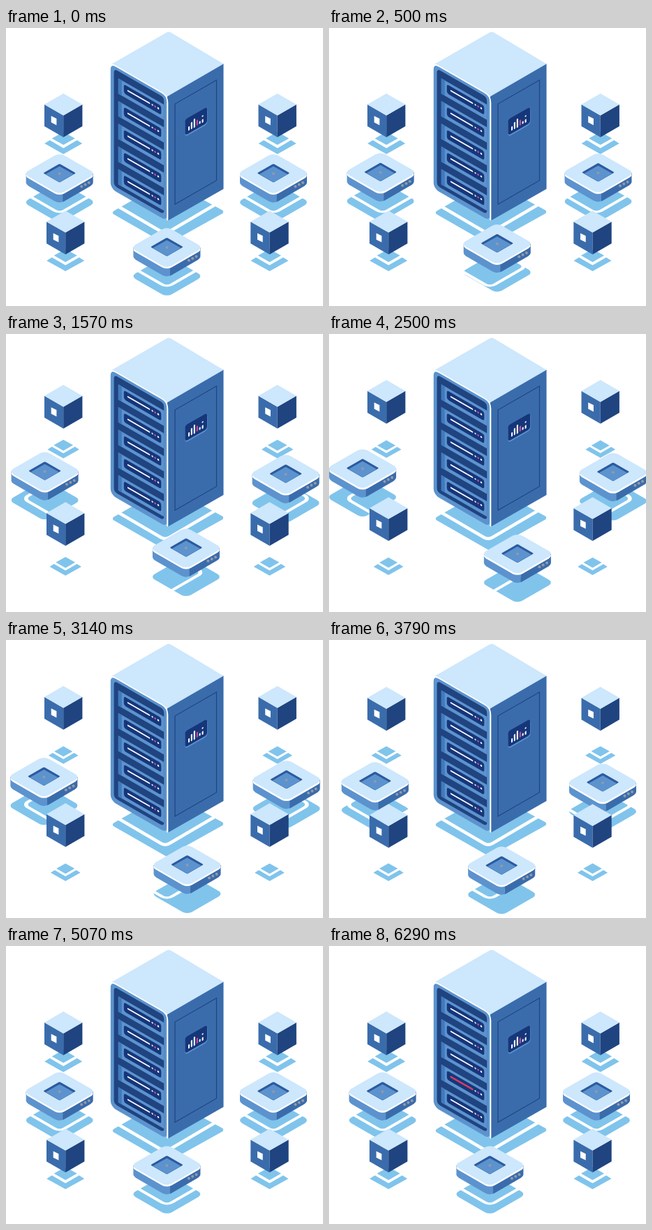
Write an HTML page that moves like this. It is 454 px wide and 399 px high and loops after 7210 ms.

```html
<!DOCTYPE html>
<html lang="en">
<head>
<meta charset="utf-8">
<title>Server network</title>
<style>
html, body { margin: 0; width: 100%; height: 100%; overflow: hidden; background: #fff; }
svg { display: block; width: 100vw; height: 100vh; }
</style>
</head>
<body>
<svg id="stage" viewBox="0 0 454 399"></svg>
<script>
const LOOP = 7210, FPS = 14;
const C = {
  pale: '#cde7fc', mid: '#5c93ce', main: '#3a6cac', navy: '#1f4480',
  deep: '#16367a', glow: '#80c4ec', red: '#e2304f', pink: '#d94f9c', grey: '#949aa6'
};

const group = (content, attrs = '') => `<g ${attrs}>${content}</g>`;
const path = (d, fill, extra = '') => `<path d="${d}" fill="${fill}" ${extra}/>`;
const line = (d, color, width, extra = '') =>
  path(d, 'none', `stroke="${color}" stroke-width="${width}" stroke-linecap="round" stroke-linejoin="round" ${extra}`);
const rect = (x, y, w, h, fill, rx = 0, extra = '') =>
  `<rect x="${x}" y="${y}" width="${w}" height="${h}" rx="${rx}" fill="${fill}" ${extra}/>`;
const dot = (x, y, r, fill) => `<circle cx="${x}" cy="${y}" r="${r}" fill="${fill}"/>`;

// Rounded square lying on the isometric floor
const tile = (cy, side, r, fill, extra = '') =>
  group(rect(-side / 2, -side / 2, side, side, fill, r, extra),
    `transform="matrix(.866 .5 -.866 .5 0 ${cy})"`);

function rack() {
  let front = rect(0, 0, 81, 180, C.mid, 8) + rect(4.8, 5, 71.7, 168, C.navy, 5);
  for (let i = 0; i < 5; i++) {
    const y = 25.3 + i * 32.6;
    front += rect(11, y - 10, 65.5, 22, C.mid) + rect(11, y - 10, 5, 22, '#4179bd')
      + rect(19, y - 6, 53.5, 13, C.deep, 3)
      + line(`M25 ${y}H55.5`, '#fff', 2)
      + dot(59.8, y, 1.2, '#dcecff') + dot(63.8, y, 1.3, C.pink) + dot(68.2, y, 1.3, '#fff');
    if (i === 3) front += line(`M25 ${y}H55.5`, C.red, 2.4, 'id="alert" pathLength="1"');
  }
  front += line('M2 1.2Q4 0 8 0H73Q81.5 0 81.5 9V178', '#fff', 2);

  const bars = [[31, 62, 6], [34.8, 58, 10], [38.8, 55.5, 13], [42.8, 59.5, 8], [46.6, 63.5, 4], [50.6, 63, 5]];
  let side = rect(11, 18.4, 59.5, 144, 'none', 0, `stroke="${C.navy}" stroke-width="1.2"`)
    + rect(25.5, 50.5, 32, 23.5, C.mid, 4) + rect(25.5, 49, 31.5, 23, C.deep, 3.5);
  bars.forEach(([x, y, h], i) => { side += rect(x - 1, y, 2, h, i === 3 ? C.pink : '#fff', 1); });
  side += dot(50.6, 58.5, 1.1, '#fff');

  return line('M156 265L231 222L308 264L230 307.5Z', C.glow, 6, `style="fill:${C.glow}"`)
    + line('M152 251L222 292Q228 295.5 234 292L308 248.5', '#fff', 4.5)
    + path('M231 97L311.5 51V231L231 277Z', C.main)
    + path('M151 52L229 7Q233 4 237 7L311.5 51.5L231.5 98Z', C.pale)
    + group(front, 'transform="matrix(1 .577 0 1 149.8 50.5)"')
    + group(side, 'transform="matrix(1 -.577 0 1 231 97)"');
}

// The white floor outline stays put while the box and its glow move
function box(id, x, y) {
  const body = path('M-48 0V13Q-48 15.5 -44.5 17.8L-7 39.6Q-3.5 41.6 0 41.6L4.5 40.6V0Z', C.mid)
    + path('M48 0V13Q48 15.5 44.5 17.8L7 39.6L4.5 40.8V0Z', C.main)
    + tile(2.6, 60, 8, '#fff') + tile(0, 60, 8, C.pale)
    + tile(-.7, 27, 1.5, '#2b5a9f')
    + path('M-20 .8L0 -10.5L20 .8L1.5 11.6Q0 12.5 -1.5 11.6Z', C.mid)
    + dot(0, 0, 1.9, C.grey)
    + [0, 1, 2].map(i => dot(31.5 + 5.3 * i, 18.6 - 2.8 * i, 2, C.grey)).join('');
  return group(
    group(tile(41.2, 60, 8, C.glow), `class="${id}"`)
    + tile(27.2, 60, 8, 'none', 'stroke="#fff" stroke-width="4.6"')
    + group(body, `class="${id}"`),
    `transform="translate(${x} ${y})"`);
}

function cube(x, y) {
  const glow = path('M0 -16.5L16.5 -7.2L0 2.2L-16.5 -7.2Z', C.glow)
    + path('M-27 .2L-19.5 -4.5L0 6.8L19.5 -4.5L27 .2L0 15.3Z', C.glow);
  const body = path('M-27.2 15.7L0 31.4V62.8L-27.2 47Z', C.main)
    + path('M27.2 15.7L0 31.4V62.8L27.2 47Z', C.navy)
    + path('M0 0L27.2 15.7L0 31.4L-27.2 15.7Z', C.pale)
    + path('M-17.5 32.3L-9.8 36V45.4L-17.5 41.6Z', '#fff');
  return group(group(group(glow, 'class="glow"'), 'transform="translate(0 71.6)"')
    + group(body, 'class="cube"'), `transform="translate(${x} ${y})"`);
}

const stage = document.getElementById('stage');
stage.innerHTML = cube(82.2, 94) + cube(388.7, 94) + rack()
  + box('left', 76.7, 209) + box('right', 383, 209) + box('low', 230.4, 315)
  + cube(85.2, 262.2) + cube(377.5, 262.2);

const clamp = v => Math.max(0, Math.min(1, v));
const sine = p => (1 - Math.cos(Math.PI * p)) / 2;
const quad = p => p < .5 ? 2 * p * p : 1 - 2 * (1 - p) ** 2;
const span = (t, a, b) => clamp((t - a) / (b - a));

// time, x, y of the lower box
const ROUTE = [
  [0, 0, 0], [980, 20.3, -10.5], [1570, 27.5, -7.8], [2450, 40.3, 0],
  [3140, 29.2, 8], [3560, 20.5, 11.5], [4290, 8.5, 4.2], [4790, 0, 0]
];
function route(t) {
  const i = ROUTE.findIndex(k => k[0] > t);
  if (i < 0) return [0, 0];
  const a = ROUTE[i - 1], b = ROUTE[i], p = span(t, a[0], b[0]);
  return [a[1] + (b[1] - a[1]) * p, a[2] + (b[2] - a[2]) * p];
}

const parts = {};
for (const name of ['left', 'right', 'low', 'cube', 'glow']) parts[name] = stage.querySelectorAll('.' + name);
const alertLine = document.getElementById('alert');
const place = (name, value) => parts[name].forEach(el => el.setAttribute('transform', value));
const move = (name, x, y) => place(name, `translate(${x.toFixed(2)} ${y.toFixed(2)})`);

function draw(t) {
  const slide = sine(span(t, 0, 2395)) - sine(span(t, 2395, 4790));
  const rise = quad(span(t, 860, 1960)) - quad(span(t, 3600, 4800));
  move('left', -28.7 * slide, -16 * slide);
  move('right', 24 * slide, -10.5 * slide);
  move('low', ...route(t));
  move('cube', 0, -28 * rise);
  place('glow', `scale(${(1 - .21 * rise).toFixed(4)})`);

  const grown = span(t, 5500, 6285);
  alertLine.setAttribute('visibility', grown > 0 ? 'visible' : 'hidden');
  alertLine.setAttribute('stroke-dasharray', `${grown} 2`);
}

const start = performance.now();
function tick() {
  const t = (performance.now() - start) % LOOP;
  draw(Math.floor((t + 2) * FPS / 1000) * 1000 / FPS);
  requestAnimationFrame(tick);
}
draw(0);
requestAnimationFrame(tick);
</script>
</body>
</html>
```
